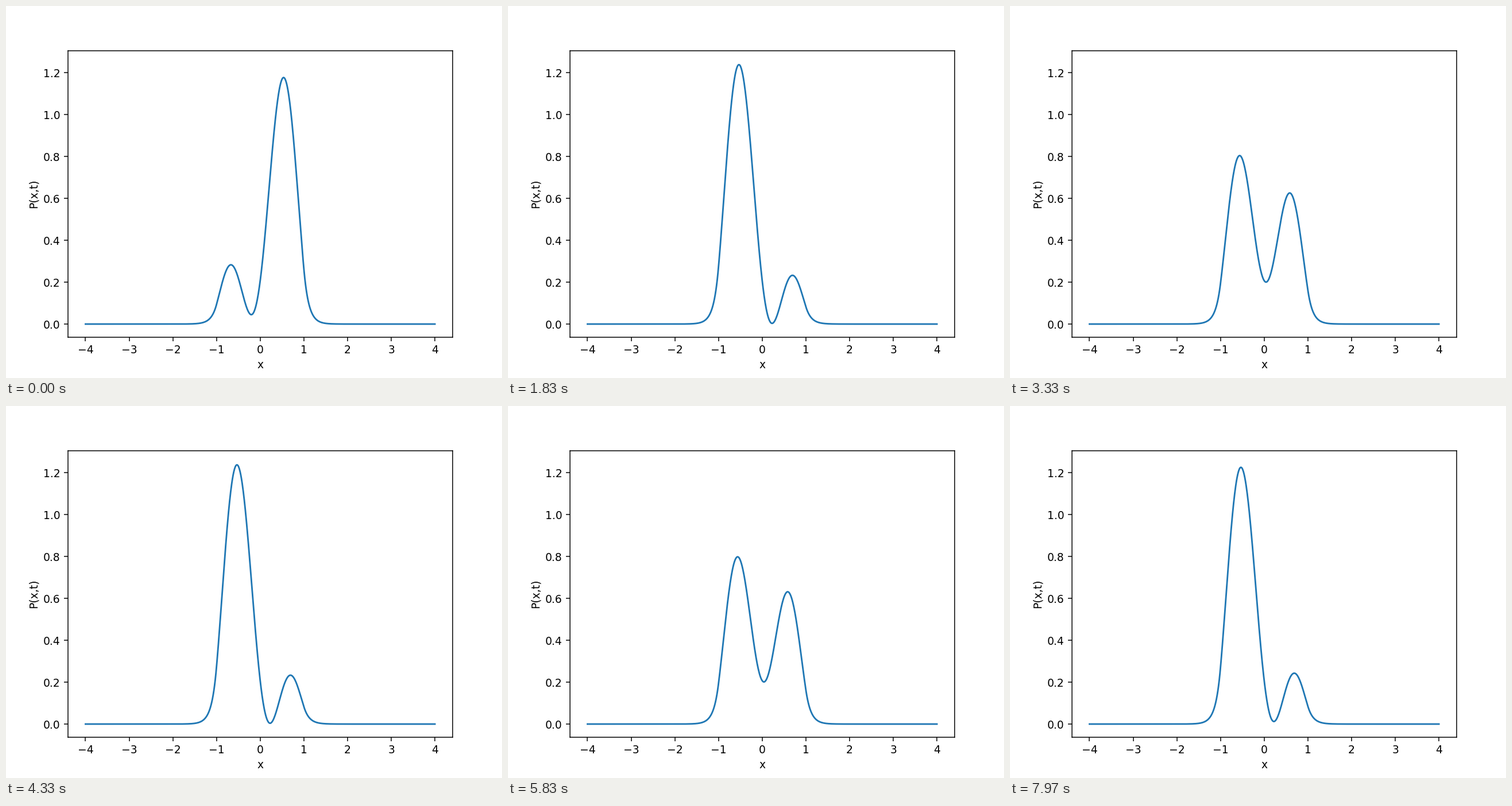
Animation, 864 px wide and 648 px high, one loop 8000 ms. Source, as a matplotlib script:

```python
import numpy as np
import matplotlib.pyplot as plt
from matplotlib.animation import FuncAnimation

# Two lowest states of a finite square well on [-1, 1], hbar = m = 1
Z0 = 5.0                     # well strength, sqrt(2 V)
C1, C2 = 0.5, np.sqrt(0.75)  # weights of the even and odd state
FRAMES = 240
LOOP_MS = 8000
DT = 1 / 15
START = 3                    # time steps already passed at the first frame


def bisect(f, lo, hi):
    for _ in range(60):
        mid = (lo + hi) / 2
        if f(lo) * f(mid) <= 0:
            hi = mid
        else:
            lo = mid
    return (lo + hi) / 2


def state(x, k, wave, parity):
    """Normalised bound state: wave inside, decaying tails outside."""
    kappa = np.sqrt(Z0**2 - k**2)
    tail = wave(k) * np.exp(-kappa * (np.abs(x) - 1))
    if parity < 0:
        tail = tail * np.sign(x)
    return np.where(np.abs(x) <= 1, wave(k * x), tail) / np.sqrt(1 + 1 / kappa)


k1 = bisect(lambda k: np.cos(k) - k / Z0, 0.5, np.pi / 2)
k2 = bisect(lambda k: np.sin(k) - k / Z0, np.pi / 2, np.pi)
omega = (k2**2 - k1**2) / 2

x = np.linspace(-4, 4, 1000)
even = C1 * state(x, k1, np.cos, 1)
odd = C2 * state(x, k2, np.sin, -1)


def density(t):
    return even**2 + odd**2 + 2 * even * odd * np.cos(omega * t)


fig, ax = plt.subplots(figsize=(6.4, 4.8), dpi=135)
line, = ax.plot(x, density(0))
ax.set_xlabel("x")
ax.set_ylabel("P(x,t)")
ax.autoscale_view()
ax.set_xlim(ax.get_xlim())
ax.set_ylim(ax.get_ylim())


def update(n):
    line.set_ydata(density((n + START) * DT))
    return line,


anim = FuncAnimation(fig, update, frames=FRAMES, interval=LOOP_MS / FRAMES,
                     repeat=True, repeat_delay=0)
plt.show()
```
